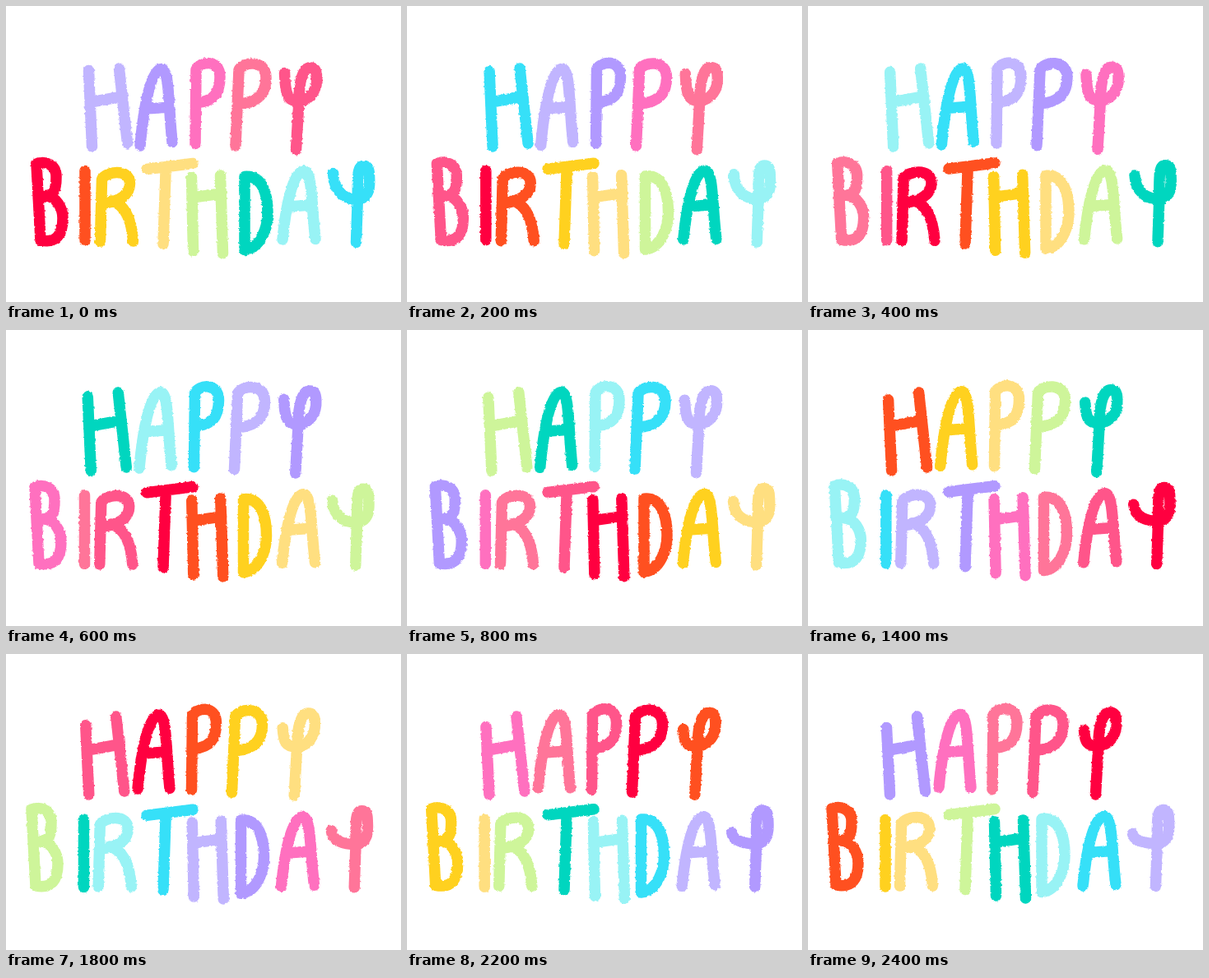
Recreate the animation shown at these times as an HTML page. Size 480x360 px, loop 2600 ms.

```html
<!DOCTYPE html>
<html lang="en">
<head>
<meta charset="utf-8">
<title>Happy Birthday</title>
<style>
  html, body { margin: 0; width: 100%; height: 100%; overflow: hidden; background: #fff; }
  svg { display: block; width: 100vw; height: 100vh; }
  path { fill: none; stroke-width: 13.5; stroke-linecap: round; stroke-linejoin: round; }
</style>
</head>
<body>
<svg id="stage" viewBox="0 0 480 360" role="img" aria-label="Happy Birthday">
  <defs>
    <filter id="chalk" filterUnits="userSpaceOnUse" x="0" y="0" width="480" height="360" color-interpolation-filters="sRGB">
      <feTurbulence id="grain" type="fractalNoise" baseFrequency="0.3" numOctaves="2" result="noise"/>
      <feDisplacementMap in="SourceGraphic" in2="noise" scale="3" xChannelSelector="R" yChannelSelector="G"/>
    </filter>
  </defs>
  <g id="word" filter="url(#chalk)"></g>
</svg>
<script>
const STEP = 200, STEPS = 13;

const palette = [
  '#c1b5ff', '#b199ff', '#ff70bf', '#ff7599', '#ff558a', '#ff0040', '#ff5020',
  '#ffd11f', '#ffdf80', '#cef59a', '#00d6bf', '#98f3f5', '#36e0f8'
];

const line = (ax, ay, bx, by) => `M${ax} ${ay}L${bx} ${by}`;

const bowl = (tx, ty, rx, jy) =>
  `L${tx} ${ty + 8}C${tx + 4} ${ty - 2} ${rx} ${ty - 6} ${rx} ${ty + .35 * (jy - ty)}` +
  `C${rx} ${jy - 10} ${tx + 20} ${jy - 2} ${tx + 2} ${jy}`;

// Each glyph turns its key points into a brush path.
const glyph = {
  // left stem, right stem, bar
  H: (...p) => [0, 4, 8].map(i => line(...p.slice(i, i + 4))).join(''),

  // left foot, apex, right foot
  A: (lx, ly, ax, ay, rx, ry) => {
    const l = ax - lx, r = rx - ax, h = ly - ay, bar = ly - .48 * h;
    return `M${lx} ${ly}C${lx + .14 * l} ${ly - .43 * h} ${lx + .45 * l} ${ay} ${ax} ${ay}` +
      `C${ax + .75 * r} ${ay} ${ax + .62 * r} ${ay + .47 * h} ${rx} ${ry}` +
      line(lx + .27 * l, bar, ax + .7 * r, bar - 2);
  },

  // top, foot, bowl edge and joint
  P: (tx, ty, fx, fy, rx, jy) => `M${fx} ${fy}` + bowl(tx, ty, rx, jy),

  // as P, then the leg's foot
  R: (tx, ty, fx, fy, rx, jy, lx, ly) =>
    glyph.P(tx, ty, fx, fy, rx, jy) +
    `M${tx + 12} ${jy - 3}Q${lx - 3} ${jy + 4} ${lx} ${ly}`,

  // left tip, loop top, loop edge and cup bottom, foot
  Y: (px, py, tx, ty, rx, by, fx, fy) => {
    const m = fx + .2 * (tx - fx);
    return `M${px} ${py}C${px + 1} ${py + .75 * (by - py)} ${m - 14} ${by} ${m} ${by}` +
      `C${m + 14} ${by - 2} ${rx + 1} ${by - 14} ${rx} ${ty + 12}` +
      `C${rx} ${ty + 3} ${tx + 5} ${ty} ${tx} ${ty}` +
      `C${tx - 8} ${ty} ${m} ${ty + 15} ${m} ${by}L${fx} ${fy}`;
  },

  // top, bottom, upper edge and waist, lower edge
  B: (tx, ty, bx, by, ux, wy, lx) =>
    `M${bx} ${by}L${tx} ${ty}C${tx + 10} ${ty - 4} ${ux} ${ty} ${ux} ${ty + .4 * (wy - ty)}` +
    `C${ux} ${wy - 8} ${tx + 22} ${wy - 2} ${tx + 11} ${wy}` +
    `C${lx - 8} ${wy} ${lx} ${wy + 15} ${lx} ${wy + .5 * (by - wy)}` +
    `C${lx} ${by - 8} ${bx + 20} ${by + 4} ${bx} ${by}`,

  I: line,

  // bar, foot
  T: (ax, ay, bx, by, fx, fy) =>
    line(ax, ay, bx, by) + line(fx + .4 * ((ax + bx) / 2 - fx), (ay + by) / 2 + 2, fx, fy),

  // top, bottom, right edge
  D: (tx, ty, bx, by, rx) =>
    `M${bx} ${by}L${tx} ${ty}C${tx + 22} ${ty - 2} ${rx} ${ty + 22} ${rx} ${(ty + by) / 2}` +
    `C${rx} ${by - 28} ${bx + 20} ${by - 2} ${bx} ${by}`
};

// Kind, key points halfway through the loop, drift over the loop: x, y, extra y of the first point.
const letters = [
  ['H', [98, 84, 102, 171, 135, 76, 145, 167, 100, 117, 139, 110], [-5, 0, 11]],
  ['A', [161, 166, 187, 75, 200, 164], [-4, -3, -5]],
  ['P', [228, 68, 227, 166, 257, 116], [-6, -3, 0]],
  ['P', [280, 69, 276, 169, 313, 118], [-6, -2, 0]],
  ['Y', [337, 87, 368, 73, 376, 114, 351, 173], [-3, -4, 15]],
  ['B', [33, 190, 38, 283, 57, 229, 65], [-8, -4, 0]],
  ['I', [95, 201, 95, 284], [-2, -2, 3]],
  ['R', [115, 201, 113, 284, 149, 238, 153, 284], [-3, -4, 0]],
  ['T', [171, 197, 227, 190, 191, 288], [0, -3, 0]],
  ['H', [226, 206, 228, 296, 261, 204, 264, 299, 227, 231, 262, 226], [1, -4, 0]],
  ['D', [287, 204, 287, 293, 315], [-6, -7, 0]],
  ['A', [335, 283, 361, 199, 375, 282], [-2, -3, 1]],
  ['Y', [396, 211, 433, 192, 440, 233, 424, 285], [-3, -5, 20]]
];

const word = document.getElementById('word');
const grain = document.getElementById('grain');
const paths = letters.map(() =>
  word.appendChild(document.createElementNS('http://www.w3.org/2000/svg', 'path')));

function pose(points, [dx, dy, first], step) {
  const u = step / (STEPS - 1) - .5;
  return points.map((v, i) => v + u * (i % 2 ? dy + (i === 1 ? first : 0) : dx));
}

// Colours move on by one letter with every step.
function draw(step) {
  grain.setAttribute('seed', step * 7 + 3);
  letters.forEach(([kind, points, drift], i) => {
    paths[i].setAttribute('d', glyph[kind](...pose(points, drift, step)));
    paths[i].setAttribute('stroke', palette[(i - step + STEPS) % STEPS]);
  });
}

const start = performance.now();
let shown = 0;
function tick(now) {
  const step = Math.floor(Math.max(0, now - start) / STEP) % STEPS;
  if (step !== shown) draw(shown = step);
  requestAnimationFrame(tick);
}
draw(0);
requestAnimationFrame(tick);
</script>
</body>
</html>
```
